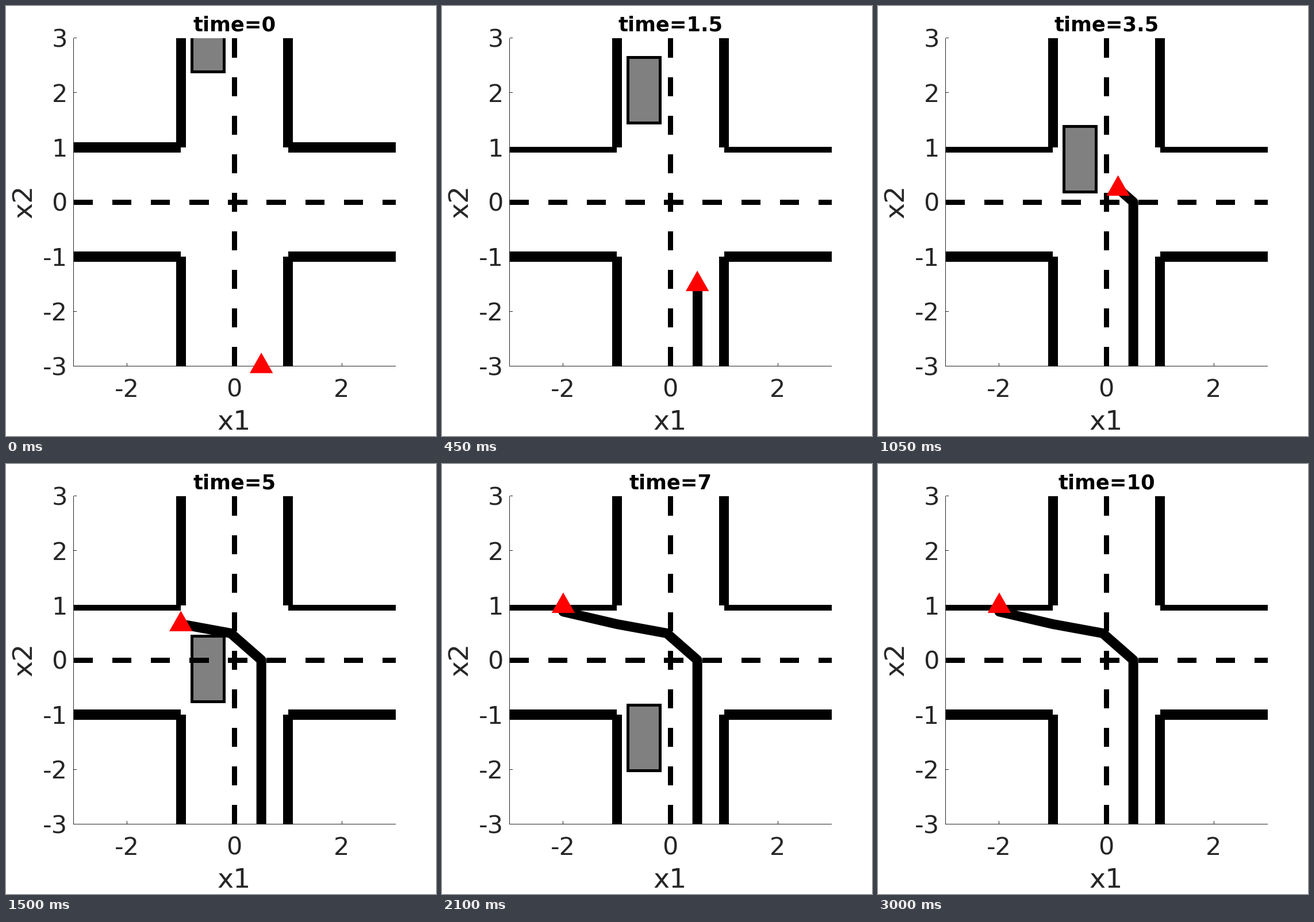
A matplotlib script for the animation above (3150 ms loop, 748x748 px).

```python
import numpy as np
import matplotlib.pyplot as plt
from matplotlib.animation import FuncAnimation
from matplotlib.patches import Polygon, Rectangle

SIZE, DPI = 748, 100
FRAMES, STEP_MS, DT = 21, 150, 0.5
INK = "#262626"
LEFT, RIGHT, TOP, BOTTOM = 118, 678, 56, 626.5
PX = 72 / DPI  # points per pixel

plt.rcParams["font.family"] = "DejaVu Sans"
plt.rcParams["toolbar"] = "None"
fig = plt.figure(figsize=(SIZE / DPI, SIZE / DPI), dpi=DPI, facecolor="white")
ax = fig.add_axes([0, 0, 1, 1])
ax.set_xlim(0, SIZE)
ax.set_ylim(SIZE, 0)
ax.axis("off")


def sx(x):
    return 397.5 + 93.3 * np.asarray(x)


def sy(y):
    return 341 - 95.08 * np.asarray(y)


def block(x0, y0, x1, y1, color="black", z=2):
    patch = Rectangle((x0, y0), x1 - x0, y1 - y0, fc=color, lw=0, zorder=z)
    return ax.add_patch(patch)


def label(x, y, text, px, color=INK, **kw):
    kw = {"ha": "center", "va": "baseline", **kw}
    return ax.text(x, y, text, fontsize=px * PX, color=color, **kw)


# Axis lines and inward ticks
block(LEFT - 0.5, TOP, LEFT + 0.5, BOTTOM + 0.5, INK, 1)
block(LEFT - 0.5, BOTTOM - 0.5, RIGHT, BOTTOM + 0.5, INK, 1)
for v in (-2, 0, 2):
    block(sx(v) - 0.5, BOTTOM - 5.5, sx(v) + 0.5, BOTTOM, INK, 1)
    label(sx(v) - 0.5, 680, str(v), 43)
for v in range(-3, 4):
    block(LEFT, sy(v) - 0.5, LEFT + 5.5, sy(v) + 0.5, INK, 1)
    label(107, sy(v) + 15.8, str(v), 43, ha="right")
label(397.3, 737, "x1", 47.5)
label(44.5, 340, "x2", 47.5, rotation=90, rotation_mode="anchor")
title = label(397.5, 43.5, "", 35.4, "black", weight="bold")

# Road walls and dashed centre lines
HALF = 8.6
upper_walls = []
for x in (-1, 1):
    cx = sx(x)
    block(cx - HALF, TOP, cx + HALF, sy(1))
    block(cx - HALF, sy(-1), cx + HALF, BOTTOM)
    a, b = (LEFT, cx) if x < 0 else (cx, RIGHT)
    block(a, sy(-1) - HALF, b, sy(-1) + HALF)
    block(a, 245, b, 255)
    upper_walls.append(block(a, sy(1) - HALF, b, 246))
DASH, PERIOD = 33.3, 67.1
for k in range(9):
    x0, y1 = LEFT + PERIOD * k, BOTTOM - PERIOD * k
    block(x0, 336.6, min(x0 + DASH, RIGHT), 346, z=4)
    block(393, max(y1 - DASH, TOP), 402, y1, z=4)

# Moving parts
clip = Rectangle((LEFT, TOP), RIGHT - LEFT, BOTTOM - TOP, transform=ax.transData)
car = Rectangle((sx(-0.8), 0), 56, 114.1, fc="#808080", ec="black",
                lw=5 * PX, joinstyle="miter", zorder=3)
ax.add_patch(car)
car.set_clip_path(clip)
trail, = ax.plot([], [], color="black", lw=17 * PX, zorder=5,
                 solid_capstyle="butt", solid_joinstyle="round")
trail.set_clip_path(clip)
marker = Polygon(np.zeros((3, 2)), fc="red", lw=0, zorder=6)
ax.add_patch(marker)

KEY_T = [0, 3, 4, 5, 6, 7]
KEY_X = [0.5, 0.5, -0.07, -1, -2, -2]
KEY_Y = [-3, 0, 0.49, 0.657, 0.885, 0.992]


def position(t):
    return sx(np.interp(t, KEY_T, KEY_X)), sy(np.interp(t, KEY_T, KEY_Y))


def draw(i):
    t = i * DT
    title.set_text(f"time={t:g}")
    for wall in upper_walls:
        wall.set_visible(i == 0)
    car.set_y(sy(3.6 - 0.63 * t) + 0.7)
    car.set_visible(t < 10)
    trail.set_data(*position(np.arange(i + 1) * DT))
    x, y = position(t)
    y += 0.6
    marker.set_xy([(x, y - 23.8), (x + 20.2, y + 11.8), (x - 20.2, y + 11.8)])
    return title, car, trail, marker, *upper_walls


anim = FuncAnimation(fig, draw, frames=FRAMES, interval=STEP_MS,
                     repeat=True, repeat_delay=0, blit=False)
plt.show()
```
